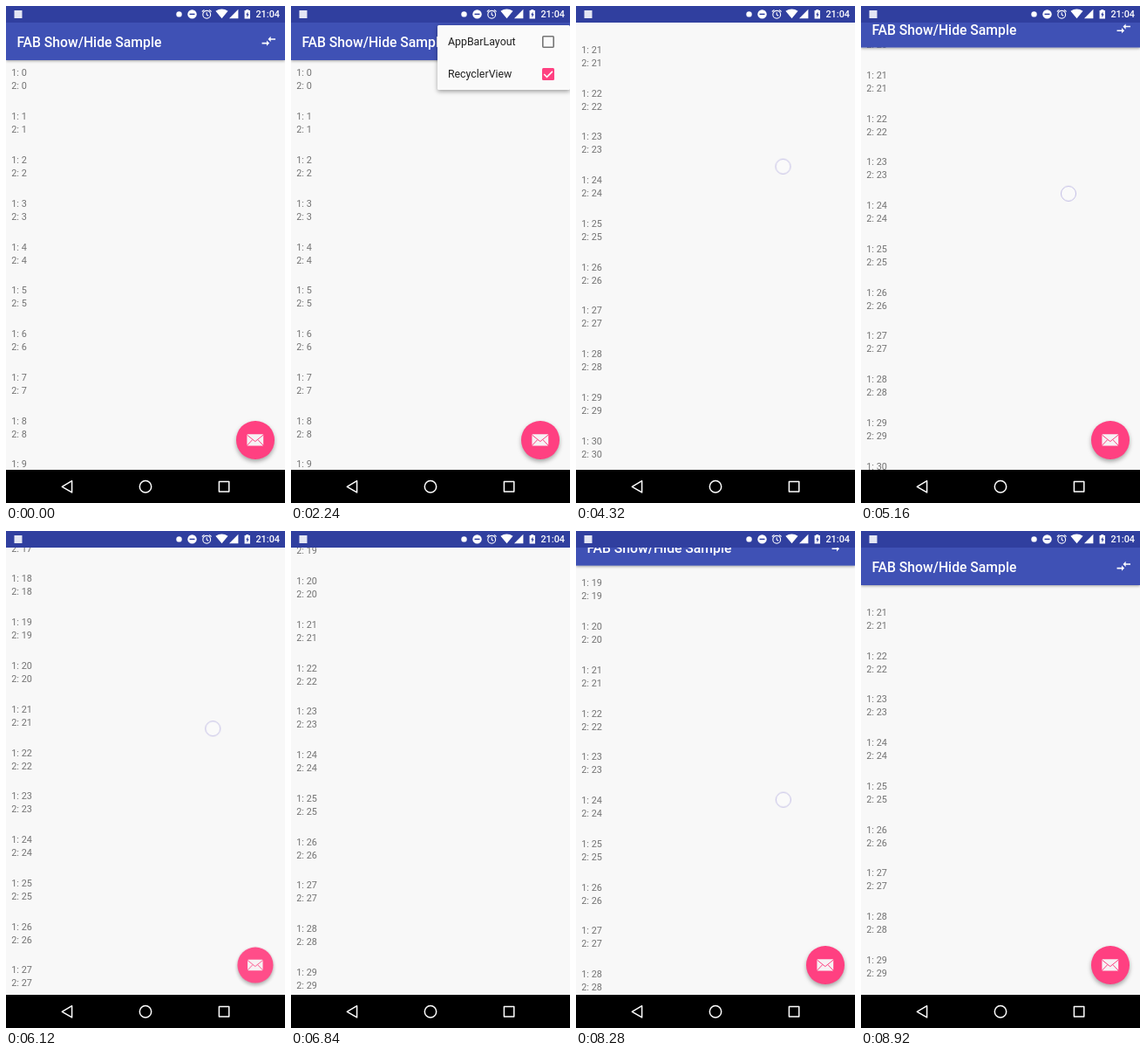
Animation of 320 by 569 pixels, one loop 8.96 s. Source, as an HTML page:

```html
<!DOCTYPE html>
<html lang="en">
<head>
<meta charset="utf-8">
<title>FAB Show/Hide Sample</title>
<style>
  html, body { margin: 0; width: 100%; height: 100%; overflow: hidden; background: #f8f8f8; }
  #stage {
    --loop: 8960ms linear infinite;
    --steps: 8960ms step-end infinite;
    position: relative; width: 320px; height: 569px; overflow: hidden;
    background: #f8f8f8; font-family: Roboto, sans-serif;
  }
  #stage > *, .row, .bar > * { position: absolute; }
  svg { display: block; overflow: visible; }

  /* The list rides along with the app bar and scrolls inside it. */
  .carrier { left: 0; top: 69.4px; animation: bar var(--loop); }
  .list { animation: scroll var(--loop); }
  .row { left: 6.2px; font-size: 10.89px; line-height: 15px; color: #737373; white-space: pre; }

  .bar {
    left: 0; top: 18.6px; width: 320px; height: 43.5px;
    background: #3f51b5; animation: bar var(--loop);
  }
  .shade { inset: 0; box-shadow: 0 1px 3px rgba(0,0,0,.36); animation: shade var(--steps); }
  .title { left: 12.4px; top: 0; font-size: 15.72px; font-weight: 500; line-height: 45px; color: #fff; white-space: nowrap; }
  .arrows { left: 291.8px; top: 12.4px; }

  .fab {
    left: 264px; top: 475px; width: 43.5px; height: 43.5px; border-radius: 50%;
    background: #ff4081; box-shadow: 0 2.5px 5px rgba(0,0,0,.34);
    animation: fab var(--loop);
  }
  .menu {
    left: 167.5px; top: 21.6px; width: 152.5px; height: 74.6px;
    background: #fafafa; border-radius: 1.5px; box-shadow: 0 2px 5px rgba(0,0,0,.36);
    animation: menu var(--loop);
  }
  .item { position: relative; height: 37.3px; padding-left: 12.4px; font-size: 12.4px; line-height: 38.4px; color: #212121; }
  .item svg { position: absolute; left: 120.3px; top: 12px; }

  .status { left: 0; top: 0; width: 320px; height: 18.6px; background: #303f9f; }
  .clock { position: absolute; right: 6px; top: 0; font-size: 10.89px; font-weight: 500; line-height: 19.4px; color: #fff; }
  .nav { left: 0; top: 531px; width: 320px; height: 38px; background: #000; }
  .touch {
    left: -9.3px; top: -9.3px; width: 18.6px; height: 18.6px; box-sizing: border-box;
    border: 1.3px solid #c1bce4; border-radius: 50%; background: rgba(255,255,255,.35);
    animation: touch-move var(--loop), touch-show var(--steps);
  }

  @keyframes bar {
    0%, 39.29% { transform: translateY(0); }
    40.18%, 50% { transform: translateY(-43.5px); }
    57.59% { transform: translateY(-14.5px); }
    59.38%, 66.52% { transform: translateY(0); }
    67.86%, 80.36% { transform: translateY(-43.5px); }
    84.38% { transform: translateY(-11px); }
    85.27%, 91.96% { transform: translateY(0); }
    92.86%, 95.54% { transform: translateY(-43.5px); }
    97.32%, 100% { transform: translateY(0); }
  }
  @keyframes shade {
    0%, 50%, 80.36%, 95.54%, 100% { opacity: 1; }
    40.18%, 67.86%, 92.86% { opacity: 0; }
  }
  @keyframes scroll {
    0%, 40.18% { transform: translateY(0); }
    41.52% { transform: translateY(-230px); animation-timing-function: cubic-bezier(.2,.55,.45,1); }
    46.88%, 59.38% { transform: translateY(-1028.6px); }
    61.61% { transform: translateY(-891px); animation-timing-function: cubic-bezier(.1,.5,.4,1); }
    65.18%, 67.86% { transform: translateY(-848.6px); }
    68.3% { transform: translateY(-873.6px); }
    69.2% { transform: translateY(-921px); animation-timing-function: cubic-bezier(.1,.5,.4,1); }
    79.24%, 85.27% { transform: translateY(-973.4px); }
    90.18%, 92.86% { transform: translateY(-941px); }
    95.54%, 100% { transform: translateY(-1028.6px); }
  }
  @keyframes fab {
    0%, 40.18%, 52.68%, 67.86%, 83.04%, 92.86%, 98.66%, 100% {
      transform: scale(1); opacity: 1; animation-timing-function: cubic-bezier(.4,0,1,1);
    }
    42.41%, 50.45%, 70.09%, 80.8%, 95.09%, 96.43% {
      transform: scale(0); opacity: 0; animation-timing-function: cubic-bezier(0,0,.2,1);
    }
  }
  @keyframes menu {
    0%, 19.64% { opacity: 0; clip-path: inset(0 0 70% 60%); animation-timing-function: cubic-bezier(0,0,.2,1); }
    22.32%, 31.25% { opacity: 1; clip-path: inset(-9px); }
    33.48% { opacity: 0; clip-path: inset(-9px); }
    100% { opacity: 0; clip-path: inset(0 0 70% 60%); }
  }
  @keyframes touch-move {
    0%, 19.2% { transform: translate(301px, 41px); }
    29.46%, 31.25% { transform: translate(238px, 78px); }
    38.84%, 39.29% { transform: translate(238px, 430px); }
    40.18% { transform: translate(238px, 386.5px); }
    41.52% { transform: translate(238px, 156.5px); }
    46.88%, 50% { transform: translate(237.5px, 183.7px); }
    57.59% { transform: translate(238px, 214.7px); }
    59.38% { transform: translate(238px, 229px); }
    61.61% { transform: translate(238px, 366.5px); }
    65.63%, 66.52% { transform: translate(237.3px, 295.5px); }
    67.86% { transform: translate(237.3px, 252px); }
    68.3% { transform: translate(237.3px, 227px); }
    69.2% { transform: translate(237.3px, 179.5px); }
    79.91%, 80.36% { transform: translate(237.8px, 189px); }
    84.38% { transform: translate(237.8px, 221.7px); }
    85.27% { transform: translate(237.8px, 232.5px); }
    90.18%, 90.63% { transform: translate(237.8px, 264.5px); }
    91.52%, 91.96% { transform: translate(237.8px, 330px); }
    92.86% { transform: translate(237.8px, 286.5px); }
    95.54% { transform: translate(237.8px, 199px); }
    97.32%, 100% { transform: translate(237.8px, 242.5px); }
  }
  @keyframes touch-show {
    0%, 19.2%, 30.8%, 41.52%, 61.61%, 69.2%, 90.63%, 97.77%, 100% { opacity: 0; }
    17.86%, 29.46%, 38.84%, 46.88%, 65.63%, 79.91%, 91.52% { opacity: 1; }
  }
</style>
</head>
<body>
<div id="stage">
  <div class="carrier"><div class="list" id="list"></div></div>

  <div class="bar">
    <div class="shade"></div>
    <div class="title">FAB Show/Hide Sample</div>
    <svg class="arrows" width="18.6" height="18.6" viewBox="0 0 24 24" fill="#fff">
      <path d="M9 14H2v2h7v3l4-4-4-4zM15 13v-3h7V8h-7V5l-4 4z"/>
    </svg>
  </div>

  <div class="fab">
    <svg width="43.5" height="43.5" viewBox="0 0 43.5 43.5">
      <rect x="12.4" y="15.3" width="18.8" height="13.2" rx="1" fill="#f6f2f4"/>
      <path d="M12.4 16l9.4 7.6 9.4-7.6M12.4 28.2l6.4-6.7M31.2 28.2l-6.4-6.7" fill="none" stroke="#ff4081"/>
    </svg>
  </div>

  <div class="menu">
    <div class="item">AppBarLayout
      <svg width="14" height="14">
        <rect x=".8" y=".8" width="12.4" height="12.4" rx="1" fill="none" stroke="#757575" stroke-width="1.6"/>
      </svg>
    </div>
    <div class="item">RecyclerView
      <svg width="14" height="14">
        <rect width="14" height="14" rx="1.5" fill="#ff4081"/>
        <path d="M2.2 7l3.3 3.3 6.4-6.4" fill="none" stroke="#fff" stroke-width="1.6"/>
      </svg>
    </div>
  </div>

  <div class="touch"></div>

  <div class="status">
    <svg width="320" height="18.6" fill="#fff">
      <rect x="9.5" y="5" width="9" height="9" fill="#e3e6f4"/>
      <circle cx="198.5" cy="9.4" r="3.2"/>
      <circle cx="213.5" cy="9.4" r="5.2"/>
      <path d="M210.5 9.4h6" stroke="#303f9f" stroke-width="1.5"/>
      <g fill="none" stroke="#fff" stroke-width="1.1">
        <circle cx="230.2" cy="9.8" r="4.4"/>
        <path d="M230.2 7.2v2.8l2 1.3M224.8 6.5l2.6-2.2M235.6 6.5l-2.6-2.2"/>
      </g>
      <path d="M247.5 14.2L240.4 5.8Q247.5 1.4 254.6 5.8zM256 14.2h10.4V3.8z"/>
      <path d="M273.6 5.1h1.8V3.9h2.8v1.2h1.8v9.3h-6.4z"/>
      <path d="M277.4 6.5l-2.2 3.8h1.3v2.9l2.2-3.9h-1.3z" fill="#303f9f"/>
    </svg>
    <div class="clock">21:04</div>
  </div>

  <div class="nav">
    <svg width="320" height="38" fill="none" stroke="#fff" stroke-width="1.5" stroke-linejoin="round">
      <path d="M64.3 19.3l11.3-6.6v13.2z"/>
      <circle cx="160" cy="19.3" r="6.7"/>
      <rect x="244.4" y="13.6" width="11.4" height="11.4"/>
    </svg>
  </div>
</div>
<script>
  const ROWS = 36, PITCH = 49.78;
  const list = document.getElementById('list');
  for (let i = 0; i < ROWS; i++) {
    const row = document.createElement('div');
    row.className = 'row';
    row.style.top = i * PITCH + 'px';
    row.textContent = `1: ${i}\n2: ${i}`;
    list.append(row);
  }
</script>
</body>
</html>
```
